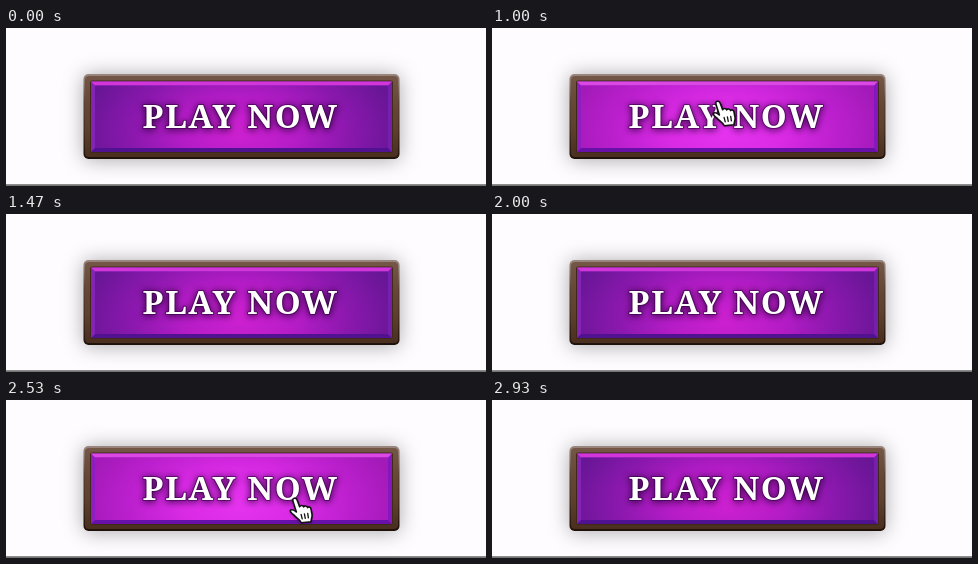
These frames come from a looping animation (480 px wide and 158 px high, 4.07 s). An HTML page with a canvas:

```html
<!DOCTYPE html>
<html lang="en">
<head>
<meta charset="utf-8">
<title>Play button</title>
<style>
  html, body { margin: 0; width: 100%; height: 100%; overflow: hidden; background: #fefcff; }
  canvas { display: block; width: 480px; height: 158px; }
</style>
</head>
<body>
<canvas role="img" aria-label="PLAY NOW"></canvas>
<script>
const LOOP = 4070;
const RATE = 15;         // pointer updates per second
const ENTER_STEPS = 4;
const LEAVE_STEPS = 3;
const canvas = document.querySelector('canvas');
const ctx = canvas.getContext('2d');
const ratio = window.devicePixelRatio || 1;
canvas.width = 480 * ratio;
canvas.height = 158 * ratio;

// The pointer glides in, rests on the button, then leaves past the right edge.
const visits = [
  { enter: 7, leave: 17, from: [421, 132], rest: [220, 72], to: [377, 106] },
  { enter: 34, leave: 40, from: [420, 130], rest: [283, 97], to: [375, 103] }
];

const idle = {
  glow: ['#cb20d0', '#b41cc6', '#8b18ae', '#681696'],
  top: '#d236da', left: '#8424b4', right: '#7420ac', bottom: '#501290'
};
const lit = {
  glow: ['#e432ee', '#d92ae4', '#bd20cf', '#a31ab8'],
  top: '#dc48e4', left: '#8e1ec2', right: '#8418bc', bottom: '#6810a8'
};

const hand = new Path2D(
  'M3.4 3.7C2.8 1 6.4 .3 7.4 2.9L9.7 9.4C10.2 7.8 12.9 7.8 13.3 9.6' +
  'C14 8 16.5 8.4 16.9 10.3C17.6 9 19.7 9.7 20 11.5L21 17' +
  'C21.3 20 20 21.4 20.1 24L11.2 25C10 22 6 20 4 17' +
  'C2 15.5 .9 14.2 1.3 13C2 11.5 4.6 12.6 6.7 14.6Z');
const knuckles = new Path2D('M11 16.8l1 4.4M14 16.3l.8 4.4M17 15.8l.6 4.4');

const easeIn = p => p * p;
const easeOut = p => 1 - (1 - p) ** 3;
const mix = (a, b, p) => a.map((v, i) => v + (b[i] - v) * p);

function pointerAt(time) {
  const step = Math.floor((time + 4) * RATE / 1000);
  const visit = visits.find(v => step >= v.enter && step <= v.leave + LEAVE_STEPS);
  if (!visit) return null;
  const { enter, leave, from, rest, to } = visit;
  if (step > leave) return mix(rest, to, easeIn((step - leave) / LEAVE_STEPS));
  return mix(from, rest, easeOut(Math.min(1, (step - enter) / ENTER_STEPS)));
}

function shadow(color, blur, y) {
  ctx.shadowColor = color;
  ctx.shadowBlur = blur * ratio;
  ctx.shadowOffsetY = y * ratio;
}

function round(x, y, w, h, r, fill) {
  ctx.beginPath();
  ctx.roundRect(x, y, w, h, r);
  ctx.fillStyle = fill;
  ctx.fill();
}

function poly(points, fill) {
  ctx.beginPath();
  points.forEach(p => ctx.lineTo(...p));
  ctx.closePath();
  ctx.fillStyle = fill;
  ctx.fill();
}

function blend(gradient, colors) {
  colors.forEach((c, i) => gradient.addColorStop(i / (colors.length - 1), c));
  return gradient;
}

const vertical = (top, bottom, colors) =>
  blend(ctx.createLinearGradient(0, top, 0, bottom), colors);

function drawFrame() {
  ctx.save();
  shadow('rgba(0,0,0,.34)', 20, 1);
  round(77.5, 46, 316, 85, 5, vertical(46, 131, ['#9a8880', '#5c4234', '#4a3022', '#1e110a']));
  ctx.restore();
  round(79, 48, 313, 81, 4, vertical(48, 129, ['#755747', '#674735', '#5c402d', '#4a2e1e']));
  round(84, 52.5, 303, 72.5, 2, '#40281b');
}

function drawPanel(look) {
  const [l, t, r, b, d] = [85, 53.5, 386, 124, 4];
  ctx.fillStyle = look.left;
  ctx.fillRect(l, t, r - l, b - t);
  poly([[r, t], [r, b], [r - d, b - d], [r - d, t + d]], look.right);
  poly([[l, b], [r, b], [r - d, b - d], [l + d, b - d]], look.bottom);
  poly([[l, t], [r, t], [r - d, t + d], [l + d, t + d]], look.top);

  ctx.save();
  ctx.beginPath();
  ctx.rect(l + d, t + d, r - l - 2 * d, b - t - 2 * d);
  ctx.clip();
  ctx.translate(234, 104);
  ctx.scale(1, .6);
  ctx.fillStyle = blend(ctx.createRadialGradient(0, 0, 8, 0, 0, 158), look.glow);
  ctx.fillRect(-160, -160, 320, 320);
  ctx.restore();
}

function drawLabel() {
  ctx.save();
  ctx.font = 'bold 33px "Noto Serif", serif';
  ctx.letterSpacing = '1.6px';
  ctx.textAlign = 'center';
  ctx.lineJoin = 'round';
  shadow('rgba(40,0,55,.9)', 7, 1.5);
  ctx.strokeStyle = 'rgba(60,0,75,.6)';
  ctx.lineWidth = 2;
  ctx.strokeText('PLAY NOW', 234.5, 99.5);
  ctx.fillStyle = '#fff';
  ctx.fillText('PLAY NOW', 234.5, 99.5);
  ctx.restore();
}

function drawHand(x, y) {
  ctx.save();
  ctx.translate(x, y);
  ctx.scale(1.1, 1.03);
  ctx.lineJoin = ctx.lineCap = 'round';
  ctx.fillStyle = '#fff';
  ctx.strokeStyle = '#111';
  ctx.lineWidth = 1.5;
  shadow('rgba(0,0,0,.4)', 3, 1);
  ctx.fill(hand);
  shadow('transparent', 0, 0);
  ctx.stroke(hand);
  ctx.lineWidth = 1.2;
  ctx.stroke(knuckles);
  ctx.restore();
}

function draw(time) {
  const pointer = pointerAt(time);
  const over = pointer && pointer[0] < 386;

  ctx.setTransform(ratio, 0, 0, ratio, 0, 0);
  ctx.fillStyle = '#fefcff';
  ctx.fillRect(0, 0, 480, 158);
  ctx.fillStyle = vertical(155, 158, ['#e0dfe0', '#8c8c8c', '#6a6a6a']);
  ctx.fillRect(0, 156, 480, 2);

  drawFrame();
  drawPanel(over ? lit : idle);
  drawLabel();
  if (pointer) drawHand(...pointer);
}

const start = performance.now();
function tick() {
  draw((performance.now() - start) % LOOP);
  requestAnimationFrame(tick);
}
tick();
</script>
</body>
</html>
```
